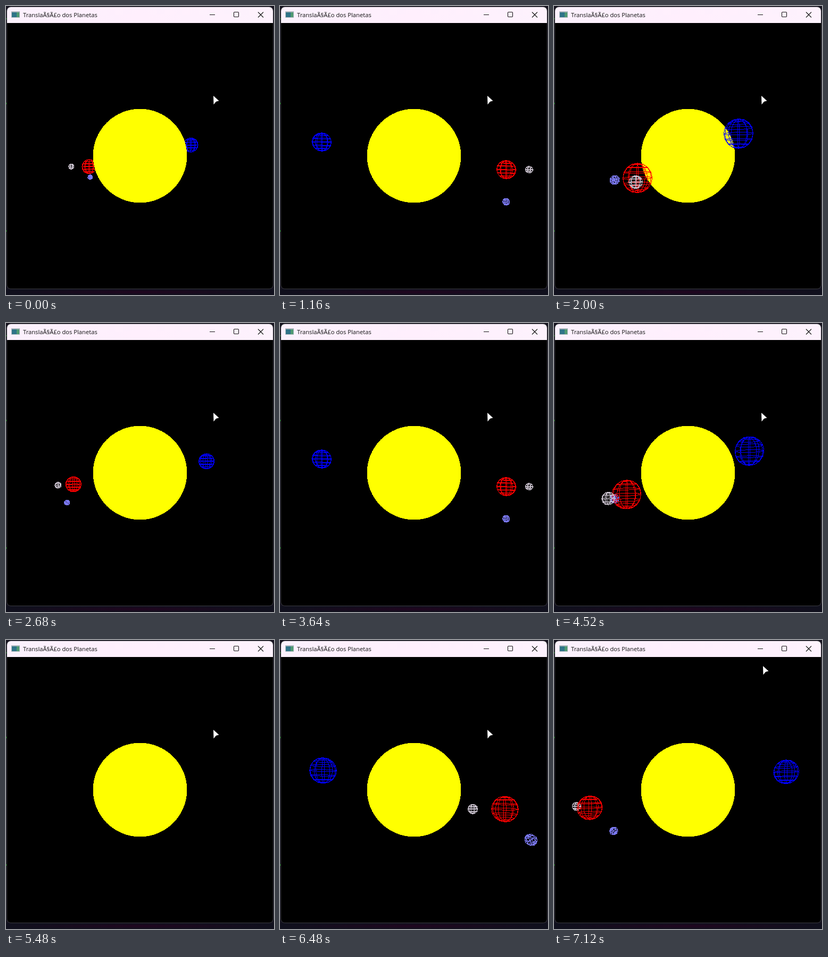
Animation of 504x544 px, one loop 7160 ms. Source, as an HTML page:

```html
<!DOCTYPE html>
<html lang="pt">
<head>
<meta charset="utf-8">
<style>
html, body { margin: 0; width: 100%; height: 100%; overflow: hidden; background: #15121f; }
svg { display: block; }
text { font: 11.2px "Open Sans", "Noto Sans", sans-serif; }
</style>
</head>
<body>
<svg width="504" height="544" viewBox="0 0 504 544">
  <defs>
    <linearGradient id="bar"><stop stop-color="#fbf1fd"/><stop offset=".5" stop-color="#ffeffd"/><stop offset="1" stop-color="#fdf2fd"/></linearGradient>
    <radialGradient id="glow"><stop stop-color="#21051f"/><stop offset="1" stop-color="#10101d"/></radialGradient>
    <clipPath id="win"><rect x="2" y="2" width="500" height="530" rx="7"/></clipPath>
  </defs>
  <rect width="504" height="544" fill="#15131f"/>
  <rect y="533" width="504" height="11" fill="url(#glow)"/>
  <path d="M0 23h1v2h-1zM0 182h1v3h-1zM0 422h1v3h-1z" fill="#189018"/>
  <rect x="1.5" y="1.5" width="501" height="531" rx="7.5" fill="#000" stroke="#3b3b42"/>
  <g clip-path="url(#win)">
    <rect x="2" y="1" width="500" height="31" fill="url(#bar)"/>
  </g>
  <g shape-rendering="crispEdges">
    <rect x="10" y="10" width="16" height="12" fill="#a9b4ba"/>
    <rect x="11" y="12" width="9" height="9" fill="#2f7488"/>
    <rect x="20" y="12" width="5" height="9" fill="#4f9a72"/>
  </g>
  <text x="32" y="21" fill="#111">TranslaÃ§Ã£o dos Planetas</text>
  <g fill="none" stroke="#151515" stroke-width="1.1">
    <path d="M383 16.5h10M474 11.5l10 10M484 11.5l-10 10"/>
    <rect x="428.5" y="11.5" width="9" height="9" rx="1.2"/>
  </g>
  <g id="scene" fill="none" shape-rendering="crispEdges"></g>
  <path id="cursor" d="M390 169l10.5 9.5-5.5 1.5-4.5 5.500z" fill="#fff"/>
</svg>
<script>
const LOOP = 7160, TICK = 40, FOCAL = 250 / Math.tan(Math.PI / 6), EYE = 5;
const scene = document.getElementById('scene'), cursor = document.getElementById('cursor');

// Orbit steps of 5 degrees reached at given times (ms)
const pace = [[0, 0], [1160, 27], [2000, 49], [3640, 99], [4520, 122], [7160, 201.2]];

function stepsAt(t) {
  const i = pace.findIndex(k => k[0] > t);
  const [t0, n0] = pace[i - 1], [t1, n1] = pace[i];
  return Math.floor(n0 + (n1 - n0) * (t - t0) / (t1 - t0) + 1e-6);
}

const rad = d => d * Math.PI / 180;
const move = (x, y, z) => p => [p[0] + x, p[1] + y, p[2] + z];

function spin(deg) {
  const c = Math.cos(rad(deg)), s = Math.sin(rad(deg));
  return ([x, y, z]) => [x * c - z * s, y, x * s + z * c];
}

// Turn about the axis (0, -1, 1)
function tilt(deg) {
  const c = Math.cos(rad(deg)), s = Math.sin(rad(deg)) * Math.SQRT1_2;
  return ([x, y, z]) => {
    const k = (z - y) * (1 - c) / 2;
    return [x * c - (y + z) * s, y * c + x * s - k, z * c + x * s + k];
  };
}

const chain = (...fns) => p => fns.reduce((q, f) => f(q), p);

function project([x, y, z]) {
  const k = FOCAL / (EYE - z);
  return (252 + x * k).toFixed(2) + ' ' + (282 - y * k).toFixed(2);
}

function wireSphere(r, slices, stacks, color, place) {
  const vertex = (i, j) => {
    const a = 2 * Math.PI * i / slices, b = Math.PI * j / stacks;
    return project(place([r * Math.sin(b) * Math.cos(a), r * Math.cos(b), r * Math.sin(b) * Math.sin(a)]));
  };
  const line = (n, f) => 'M' + Array.from({ length: n + 1 }, (_, i) => f(i)).join('L');
  let d = '';
  for (let j = 1; j < stacks; j++) d += line(slices, i => vertex(i, j));
  for (let i = 0; i < slices; i++) d += line(stacks, j => vertex(i, j));
  return { z: place([0, 0, 0])[2], svg: `<path d="${d}" stroke="${color}"/>` };
}

function draw(t) {
  const a = 225 + 5 * stepsAt(t);
  const red = chain(move(2, -.3, 0), spin(a));
  const bodies = [
    { z: 0, svg: `<circle cx="252" cy="282" r="${FOCAL / Math.sqrt(EYE * EYE - 1)}" fill="#ff0"/>` },
    wireSphere(.2, 10, 8, '#00f', chain(move(2, .3, 0), spin(180 - a))),
    wireSphere(.2, 10, 8, '#f00', red),
    wireSphere(.075, 8, 6, '#c8c0cc', chain(move(.5, 0, 0), spin(3 * a), red)),
    wireSphere(.075, 8, 6, '#7a78f0', chain(move(0, -.7, 0), tilt(2 * a), red))
  ];
  scene.innerHTML = bodies.sort((p, q) => p.z - q.z).map(b => b.svg).join('');

  const u = Math.min(1, Math.max(0, (t - 6600) / 440)), e = u * u * (3 - 2 * u);
  cursor.setAttribute('transform', `translate(${3 * e} ${-120 * e})`);
}

const start = performance.now();
function frame() {
  const t = (performance.now() - start) % LOOP;
  draw(Math.floor(t / TICK) * TICK);
  requestAnimationFrame(frame);
}
frame();
</script>
</body>
</html>
```
